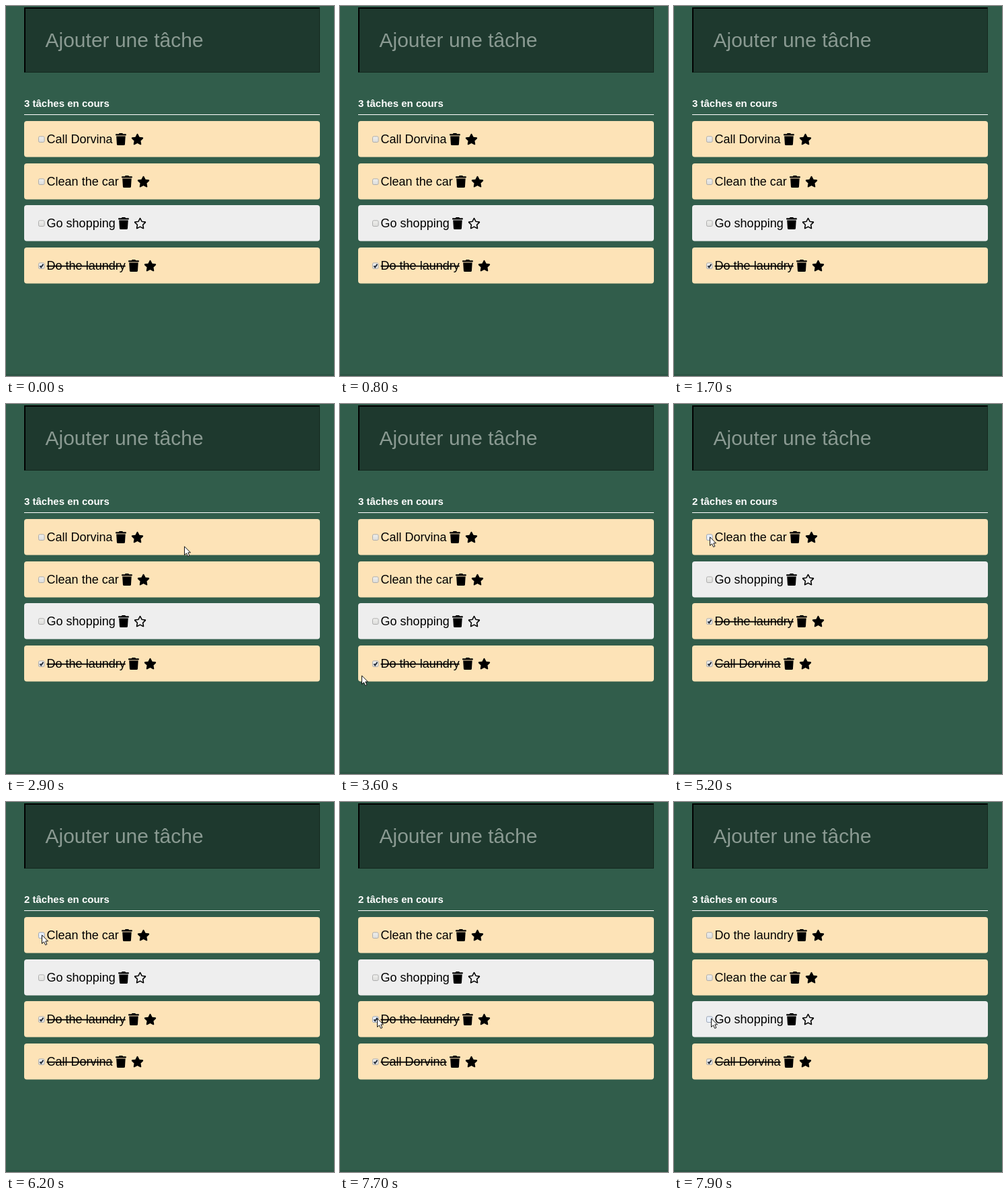
An HTML page that plays this animation: 488x550 px, repeating every 8 s.

```html
<!DOCTYPE html>
<html lang="fr">
<head>
<meta charset="utf-8">
<title>Liste de tâches</title>
<style>
  html, body { margin: 0; width: 100%; height: 100%; overflow: hidden; background: #315d4b; }
  svg { display: block; width: 488px; height: 550px; font-family: "Liberation Sans", Arial, sans-serif; }
  .done text { text-decoration: line-through; }
  .check { display: none; }
  .done .check { display: inline; }
  .box { fill: url(#face); stroke: #adadad; }
  .hover .box { fill: #e9f0fb; stroke: #9aa6b8; }
</style>
</head>
<body>
<svg viewBox="0 0 488 550">
  <defs>
    <linearGradient id="face" x2="0" y2="1">
      <stop stop-color="#f0f0ee"/><stop offset="1" stop-color="#dcdcda"/>
    </linearGradient>
    <path id="trash" transform="scale(.0352)" d="M432 32H312l-9.4-18.7A24 24 0 0 0 281.1 0H166.8a23.7 23.7 0 0 0-21.4 13.3L136 32H16A16 16 0 0 0 0 48v32a16 16 0 0 0 16 16h416a16 16 0 0 0 16-16V48a16 16 0 0 0-16-16zM53.2 467a48 48 0 0 0 47.9 45h245.8a48 48 0 0 0 47.9-45L416 128H32z"/>
    <path id="star" d="M528.1 171.5L382 150.2 316.7 17.8c-11.7-23.6-45.6-23.9-57.4 0L194 150.2 47.9 171.5c-26.2 3.8-36.7 36.1-17.7 54.6l105.7 103-25 145.5c-4.5 26.3 23.2 46 46.4 33.7L288 439.6l130.7 68.7c23.2 12.2 50.9-7.4 46.4-33.7l-25-145.5 105.7-103c19-18.5 8.5-50.8-17.7-54.6z"/>
    <path id="hole" d="M388.6 312.3l23.7 138.4L288 385.4l-124.3 65.3 23.7-138.4-100.6-98 139-20.2 62.2-126 62.2 126 139 20.2z"/>
  </defs>
  <rect width="488" height="550" fill="#315d4b"/>
  <rect y="547" width="488" height="3" fill="#2d5545"/>
  <rect x="27" y="2" width="440" height="97" fill="#1e392e"/>
  <path d="M466.5 3V98.500H28" fill="none" stroke="#14281f"/>
  <path d="M27 2H467L466 4H29V98L27 99z"/>
  <text x="58.500" y="61" font-size="30" fill="#8a9a92">Ajouter une tâche</text>
  <text id="count" x="27" y="150" font-size="15" font-weight="bold" fill="#fff"></text>
  <rect x="27" y="161" width="440" height="1" fill="#fff"/>
  <g id="list"></g>
  <path id="cursor" d="M.5 .8V13.500L3.500 10.800 5.700 15.500 7.900 14.500 5.800 9.900H9.500z" fill="#fff" stroke="#111"/>
</svg>
<script>
const LOOP = 8000, STEP = 100;
const $ = id => document.getElementById(id);

const tasks = {
  call: { label: "Call Dorvina", starred: true },
  car: { label: "Clean the car", starred: true },
  shop: { label: "Go shopping", starred: false },
  laundry: { label: "Do the laundry", starred: true },
};

// The last task of each state is done, preceded by `done - 1` others.
const states = [
  { at: 0, order: ["call", "car", "shop", "laundry"], done: 1, open: 3 },
  { at: 5200, order: ["car", "shop", "laundry", "call"], done: 2, open: 2 },
  { at: 7800, order: ["laundry", "car", "shop", "call"], done: 1, open: 3 },
];

// Pointer waypoints: time, x, y
const path = [
  [2800, 400, 186], [2900, 265, 211], [3200, 90, 300], [3600, 32, 403],
  [3700, 53, 197], [6600, 53, 197], [7000, 42, 380], [7300, 55, 321], [8000, 55, 321],
];

for (const task of Object.values(tasks)) {
  const g = document.createElementNS("http://www.w3.org/2000/svg", "g");
  g.innerHTML = `
    <rect x="27" width="440" height="53.4" rx="4" fill="${task.starred ? "#fde3b7" : "#eee"}"/>
    <rect class="box" x="48.5" y="22.9" width="8.6" height="8.6" rx="1.8"/>
    <path class="check" d="M50.500 27.300L52.200 29.400 55.500 24.800" fill="none" stroke="#222b38" stroke-width="1.9"/>
    <text x="60.600" y="33" font-size="18">${task.label}</text>`;
  $("list").append(g);
  const x = 60.6 + g.querySelector("text").getComputedTextLength() + 4.4;
  g.insertAdjacentHTML("beforeend", `
    <use href="#trash" x="0" transform="translate(${x} 18)"/>
    <g transform="translate(${x + 23.1} 18.800) scale(.0325)">
      <use href="#star"/>${task.starred ? "" : '<use href="#hole" fill="#eee"/>'}
    </g>`);
  task.node = g;
}

function pointerAt(t) {
  const i = path.findIndex(p => p[0] > t);
  if (i < 1) return null;
  const [t0, x0, y0] = path[i - 1], [t1, x1, y1] = path[i];
  const k = (t - t0) / (t1 - t0);
  return [x0 + (x1 - x0) * k, y0 + (y1 - y0) * k];
}

function draw(now) {
  const t = Math.floor(now % LOOP / STEP) * STEP;
  const state = states.findLast(s => s.at <= t);
  const pointer = pointerAt(t);
  $("count").textContent = `${state.open} tâches en cours`;
  state.order.forEach((key, i) => {
    const { node } = tasks[key], y = Math.round(171.2 + 62.5 * i);
    const over = pointer && Math.abs(pointer[0] - 53) < 6 && Math.abs(pointer[1] - y - 27) < 6;
    node.setAttribute("transform", `translate(0 ${y})`);
    node.classList.toggle("done", i >= 4 - state.done);
    node.classList.toggle("hover", !!over);
  });
  $("cursor").style.display = pointer ? "" : "none";
  if (pointer) $("cursor").setAttribute("transform", `translate(${pointer.map(Math.round)})`);
  requestAnimationFrame(() => draw(performance.now() - start));
}

const start = performance.now();
draw(0);
</script>
</body>
</html>
```
